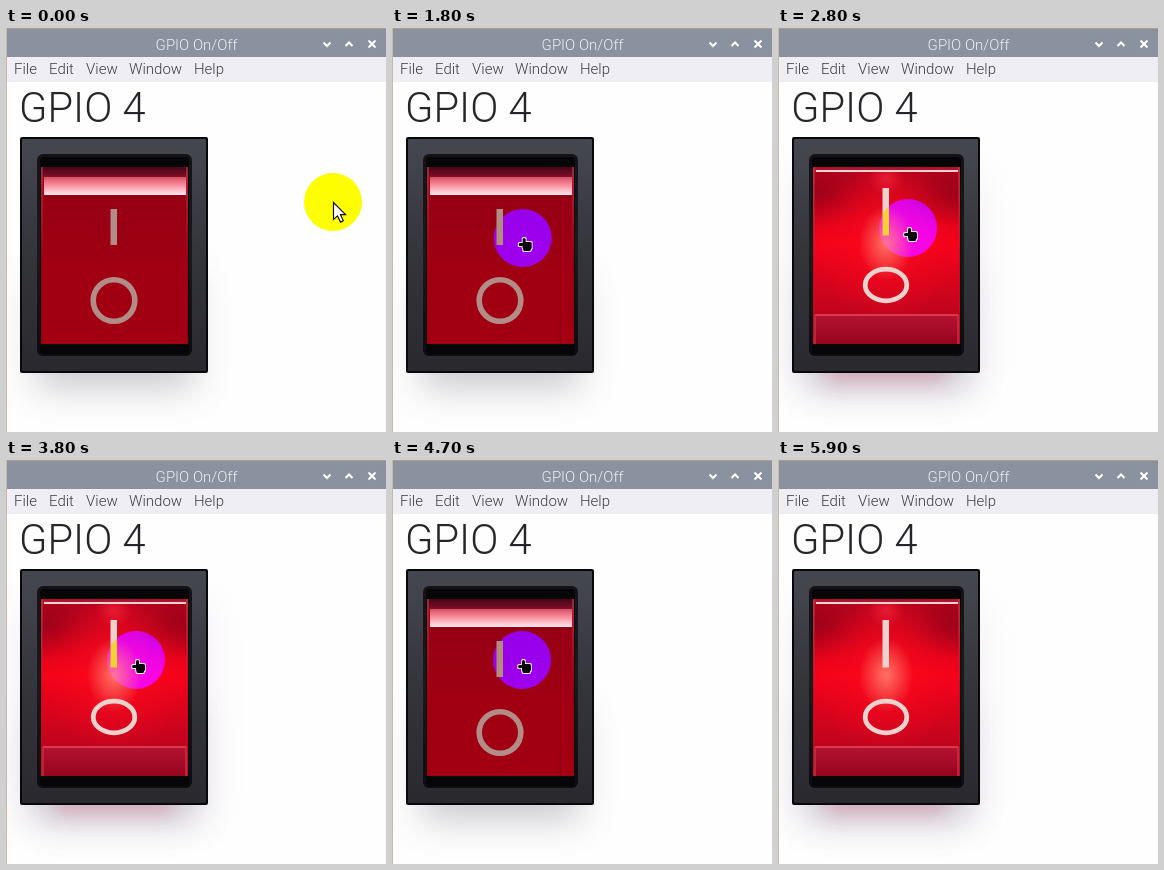
An HTML page with a canvas that plays this animation: 380 by 404 pixels, repeating every 6.7 s.

```html
<!DOCTYPE html>
<html lang="en">
<head>
<meta charset="utf-8">
<title>GPIO On/Off</title>
<style>
html, body { margin: 0; width: 100%; height: 100%; overflow: hidden; background: #fefefe; }
canvas { display: block; width: 380px; height: 404px; }
</style>
</head>
<body>
<canvas id="stage" width="380" height="404"></canvas>
<script>
const ctx = document.getElementById('stage').getContext('2d');
const LOOP = 6700, STEP = 100, PRESS = 300;
const FONT = 'Roboto, "Open Sans", sans-serif';

const clamp = v => Math.max(0, Math.min(1, v));
const lerp = (a, b, u) => a + (b - a) * u;
const rgb = (c, alpha = 1) => `rgba(${c.map(Math.round).join(',')},${alpha})`;
const mix = (a, b, u) => rgb(a.map((v, i) => lerp(v, b[i], u)));

// cubic-bezier(1, 0, 1, 1)
function snap(x) {
  const s = 1 - Math.cbrt(1 - clamp(x));
  return s * s * (3 - 2 * s);
}

// 0 = off, 1 = fully pressed on
function rocker(t) {
  if (t < 3600) return snap((t - 2300) / PRESS);
  if (t < 4100) return 1 - snap((t - 3800) / PRESS);
  if (t < 4900) return 0.06 * clamp((4400 - t) / 300);
  return snap((t - 4970) / PRESS);
}

// accelerates away from a resting point
const leave = (x, y, dx, dy, steps) => [x + dx * steps ** 2, y + dy * steps ** 2];

function pointer(t) {
  if (t < 1400) return leave(327, 174, 8, 76, t / 100);
  if (t < 5600) {
    const e = 1 - (1 - clamp((t - 1400) / 600)) ** 2.5;
    return [lerp(141, 130, e), lerp(356, 200, e)];
  }
  return leave(130, 200, 43, 38, (t - 5600) / 100);
}

function rect(x0, y0, x1, y1, fill) {
  ctx.fillStyle = fill;
  ctx.fillRect(x0, y0, x1 - x0, y1 - y0);
}

function round(x0, y0, x1, y1, r, fill) {
  ctx.beginPath();
  ctx.roundRect(x0, y0, x1 - x0, y1 - y0, r);
  ctx.fillStyle = fill;
  ctx.fill();
}

function gradient(y0, y1, ...colors) {
  const g = ctx.createLinearGradient(0, y0, 0, y1);
  colors.forEach((c, i) => g.addColorStop(i / (colors.length - 1), c));
  return g;
}

function glow(x, y, r, sx, sy, color, alpha) {
  ctx.save();
  ctx.translate(x, y);
  ctx.scale(sx, sy);
  const g = ctx.createRadialGradient(0, 0, 0, 0, 0, r);
  g.addColorStop(0, rgb(color, alpha));
  g.addColorStop(0.5, rgb(color, alpha * 0.5));
  g.addColorStop(1, rgb(color, 0));
  ctx.fillStyle = g;
  ctx.fillRect(-r, -r, 2 * r, 2 * r);
  ctx.restore();
}

function blurred(x0, y0, x1, y1, blur, color) {
  ctx.save();
  ctx.shadowColor = color;
  ctx.shadowBlur = blur;
  ctx.shadowOffsetX = 1000;
  rect(x0 - 1000, y0, x1 - 1000, y1, '#000');
  ctx.restore();
}

function text(s, x, y, size, color) {
  ctx.font = `300 ${size}px ${FONT}`;
  ctx.fillStyle = color;
  ctx.fillText(s, x, y);
}

function line(points, width, color) {
  ctx.beginPath();
  points.forEach(([x, y]) => ctx.lineTo(x, y));
  ctx.lineWidth = width;
  ctx.strokeStyle = color;
  ctx.stroke();
}

function drawWindow() {
  rect(0, 0, 380, 404, '#fefefe');
  rect(0, 29, 380, 54, '#eeeef4');
  rect(0, 0, 380, 29, '#89929e');
  rect(0, 0, 380, 1, '#b39d86');
  rect(0, 0, 1, 404, '#c8bba2');
  ctx.textAlign = 'center';
  text('GPIO On/Off', 190.5, 22, 15, '#eef0f4');
  ctx.textAlign = 'left';
  [['File', 8], ['Edit', 43], ['View', 80], ['Window', 123], ['Help', 188]]
    .forEach(([s, x]) => text(s, x, 46, 15, '#3c3c42'));
  text('GPIO 4', 13, 94, 41.6, '#26262a');
  const white = '#fff';
  line([[317.5, 14.5], [321, 18], [324.5, 14.5]], 2, white);
  line([[339.5, 18], [343, 14.5], [346.5, 18]], 2, white);
  line([[362.5, 12.5], [369.5, 19.5]], 2, white);
  line([[369.5, 12.5], [362.5, 19.5]], 2, white);
}

function drawCase(p) {
  blurred(30, 250, 188, 360, 34, 'rgba(100,100,115,0.34)');
  if (p > 0) {
    blurred(18, 150, 198, 358, 36, rgb([190, 165, 200], 0.25 * p));
    blurred(50, 310, 166, 354, 18, rgb([220, 120, 140], 0.35 * p));
  }
  round(14, 109, 202, 345, 2, '#08080a');
  round(16, 111, 200, 343, 1, gradient(111, 343, '#464850', '#34343b', '#2a2930'));
  round(31, 126, 186, 328, 6, gradient(126, 328, '#131317', '#1a191e', '#0c0b0f'));
  round(34, 129, 183, 326, 4, '#060508');
}

function drawRocker(p) {
  const warm = clamp(p * 8);
  const late = clamp((p - 0.35) / 0.65);
  const barTop = lerp(149 + 2 * warm, 142, p);
  const barEnd = lerp(167, 144, clamp(p * 1.15));
  const fold = lerp(316, 287, late);

  rect(35, 139, 182, 316, mix([158, 0, 18], [215, 4, 30], p));
  rect(35, 139, 182, barTop, gradient(139, barTop,
    mix([72, 4, 22], [165, 16, 40], warm), mix([128, 16, 40], [180, 22, 48], warm)));
  rect(36, barEnd, 181, fold, gradient(barEnd, fold,
    mix([150, 0, 20], [185, 4, 30], p), mix([160, 0, 18], [245, 2, 26], p),
    mix([162, 0, 18], [190, 4, 30], p)));

  if (p > 0) {
    ctx.save();
    ctx.beginPath();
    ctx.rect(36, barEnd, 145, fold - barEnd);
    ctx.clip();
    [[36, 165], [181, 165]]
      .forEach(([x, y]) => glow(x, y, 50, 1.2, 0.7, [110, 0, 20], 0.5 * p));
    glow(108, 215, 80, 0.9, 1, [255, 10, 30], 0.7 * p);
    glow(108, 150, 18, 1, 1, [255, 40, 60], 0.6 * p);
    glow(108, 215, 34, 0.8, 1.1, [255, 150, 125], 0.75 * late);
    ctx.restore();
  }

  if (late > 0) {
    rect(36, fold, 181, 316, gradient(fold, 316,
      mix([162, 0, 18], [180, 18, 48], late), mix([158, 0, 18], [150, 4, 30], late)));
    rect(37, fold - 1, 180, fold + 1, rgb([225, 70, 85], 0.8 * late));
    rect(36, fold, 38, 316, rgb([205, 55, 75], 0.6 * late));
    rect(179, fold, 181, 316, rgb([205, 55, 75], 0.6 * late));
  }

  const edge = gradient(139, 235, 'rgba(195,60,80,0.6)', 'rgba(195,60,80,0)');
  rect(35, 139, 37, 235, edge);
  rect(180, 139, 182, 235, edge);

  const dim = clamp(p * 4) * (1 - late);
  rect(38, barTop, 180, barEnd, gradient(barTop, barEnd,
    mix([215, 78, 100], [255, 195, 195], p), mix([250, 150, 165], [255, 215, 215], p),
    mix([255, lerp(235, 130, dim), lerp(238, 145, dim)], [255, 215, 215], p)));

  const mark = mix([178, 140, 134], [240, 210, 205], p);
  rect(104.5, lerp(181, 160, p), 111, lerp(217, 207.5, p), mark);
  ctx.beginPath();
  ctx.ellipse(108, lerp(272.5, 257, p), 20.8, lerp(20.8, 15.8, p), 0, 0, 2 * Math.PI);
  ctx.lineWidth = lerp(5.6, 4.8, p);
  ctx.strokeStyle = mark;
  ctx.stroke();
}

function drawDisc(x, y) {
  ctx.globalCompositeOperation = 'difference';
  ctx.beginPath();
  ctx.arc(x, y, 29, 0, 2 * Math.PI);
  ctx.fillStyle = '#00f';
  ctx.fill();
  ctx.globalCompositeOperation = 'source-over';
}

function drawArrow(x, y) {
  const shape = [[0, 0], [0, 17], [4, 13.4], [7, 19.6], [9.8, 18.3], [7, 12.2], [12, 12.2]];
  ctx.beginPath();
  shape.forEach(([dx, dy]) => ctx.lineTo(x + dx + 0.5, y + dy + 0.5));
  ctx.closePath();
  ctx.fillStyle = '#fff';
  ctx.fill();
  ctx.lineWidth = 1.2;
  ctx.strokeStyle = '#111';
  ctx.stroke();
}

function drawHand(x, y) {
  const parts = [[0, 0, 3, 10], [0, 4, 9, 11], [-4, 5, 2, 8], [0.5, 9, 8, 13]];
  const layer = (grow, fill) => parts.forEach(([x0, y0, x1, y1]) =>
    round(x + x0 - grow, y + y0 - grow, x + x1 + grow, y + y1 + grow, 1.5, fill));
  layer(0.9, '#e8e8ee');
  layer(0, '#08080a');
}

function drawPointer(t) {
  const [x, y] = pointer(t);
  drawDisc(x, y);
  const over = x > 14 && x < 202 && y > 109 && y < 345;
  if (over) drawHand(x, y);
  else drawArrow(x, y);
}

function draw(t) {
  const p = rocker(t);
  drawWindow();
  drawCase(p);
  drawRocker(p);
  drawPointer(t);
}

const start = performance.now();
function tick() {
  const t = Math.max(0, performance.now() - start) % LOOP;
  draw(Math.floor(t / STEP) * STEP);
  requestAnimationFrame(tick);
}
tick();
</script>
</body>
</html>
```
